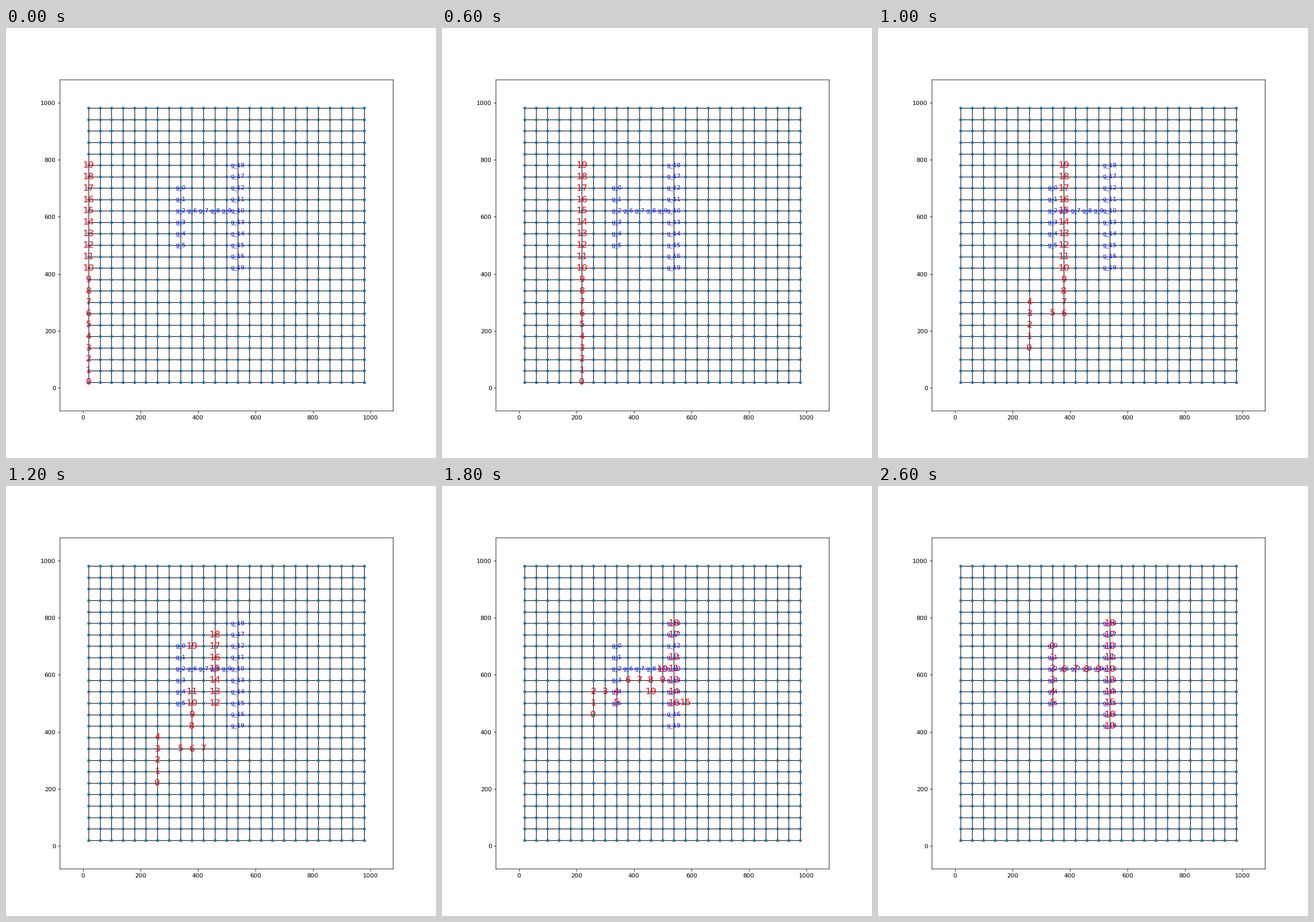
These frames come from a looping animation (748 px wide and 748 px high, 2.7 s). A matplotlib script:

```python
import numpy as np
import matplotlib.pyplot as plt
from matplotlib.animation import FuncAnimation
from matplotlib.collections import PatchCollection
from matplotlib.patches import Circle

SIZE = 748
DPI = 74.8
CELLS = 25
FRAMES = 27
LOW, HIGH = -80, 1080
HALF_STEP = 0.75  # half a lattice step in data units
MOVES = {"R": (1, 0), "L": (-1, 0), "U": (0, 1), "D": (0, -1)}

# Each route is a list of runs: a direction and a number of cells.
ROUTES = [f"R6 U{13 - i} R1 U{4 - i} R1" for i in range(5)] + [
    "R8 U7",
    "R9 U9",
    "R10 U8",
    "R9 U6 R2 U1",
    "R9 U3 R2 U1 R1 U2",
    "R9 U3 R1 U1 R2 U1 R1",
    "R9 U3 R3 U1 R1 U1",
    "R12 U3 R1 U2",
    "R12 U1 R1",
    "R13 D1",
    "R14 D3 L1",
    "R11 D3 R1 D1 R1 D1",
    "R13 U1",
    "R13 U1",
    "R9 D2 R2 D7 R2",
]


def to_data(cell):
    return 20 + 40 * np.asarray(cell)


def snap(values, steps):
    """Round data values to a lattice of so many steps across the axes."""
    unit = (HIGH - LOW) / steps
    return LOW + unit * np.round((values - LOW) / unit)


def trace(row, route):
    """List the cells a robot visits, starting in the first column."""
    cells = [(0, row)]
    for run in route.split():
        dx, dy = MOVES[run[0]]
        for _ in range(int(run[1:])):
            x, y = cells[-1]
            cells.append((x + dx, y + dy))
    return to_data(cells) + (-HALF_STEP, HALF_STEP)


def label(ax, pos, text, color, size):
    return ax.text(*pos, text, color=color, fontsize=size,
                   ha="center", va="center")


plt.rcParams.update({"font.family": "DejaVu Sans",
                     "text.hinting": "none",
                     "path.snap": False})
fig, ax = plt.subplots(figsize=(SIZE / DPI, SIZE / DPI), dpi=DPI)
# Strokes run through the middle of the lattice steps.
fig.subplots_adjust(left=0.1255, right=0.9005, bottom=0.1095, top=0.8795)
ax.set_xlim(LOW, HIGH)
ax.set_ylim(LOW, HIGH)

cols = snap(to_data(np.arange(CELLS)), 775)
rows = snap(to_data(np.arange(CELLS)), 770)
ax.vlines(cols, rows[0], rows[-1], color="black", lw=1, zorder=2)
ax.hlines(rows, cols[0], cols[-1], color="black", lw=1, zorder=2)
dots = [Circle((x, y), 5.2) for x in cols for y in rows]
ax.add_collection(PatchCollection(dots, color="C0", lw=0, zorder=2.5))

paths = [trace(row, route) for row, route in enumerate(ROUTES)]
for i, path in enumerate(paths):
    label(ax, path[-1], f"g_{i}", "blue", 10)
robots = [label(ax, path[0], str(i), "red", 15)
          for i, path in enumerate(paths)]


def update(frame):
    step = max(frame - 1, 0)
    for robot, path in zip(robots, paths):
        robot.set_position(path[min(step, len(path) - 1)])
    return robots


anim = FuncAnimation(fig, update, frames=FRAMES, interval=100,
                     repeat=True, repeat_delay=0, blit=False)
plt.show()
```
